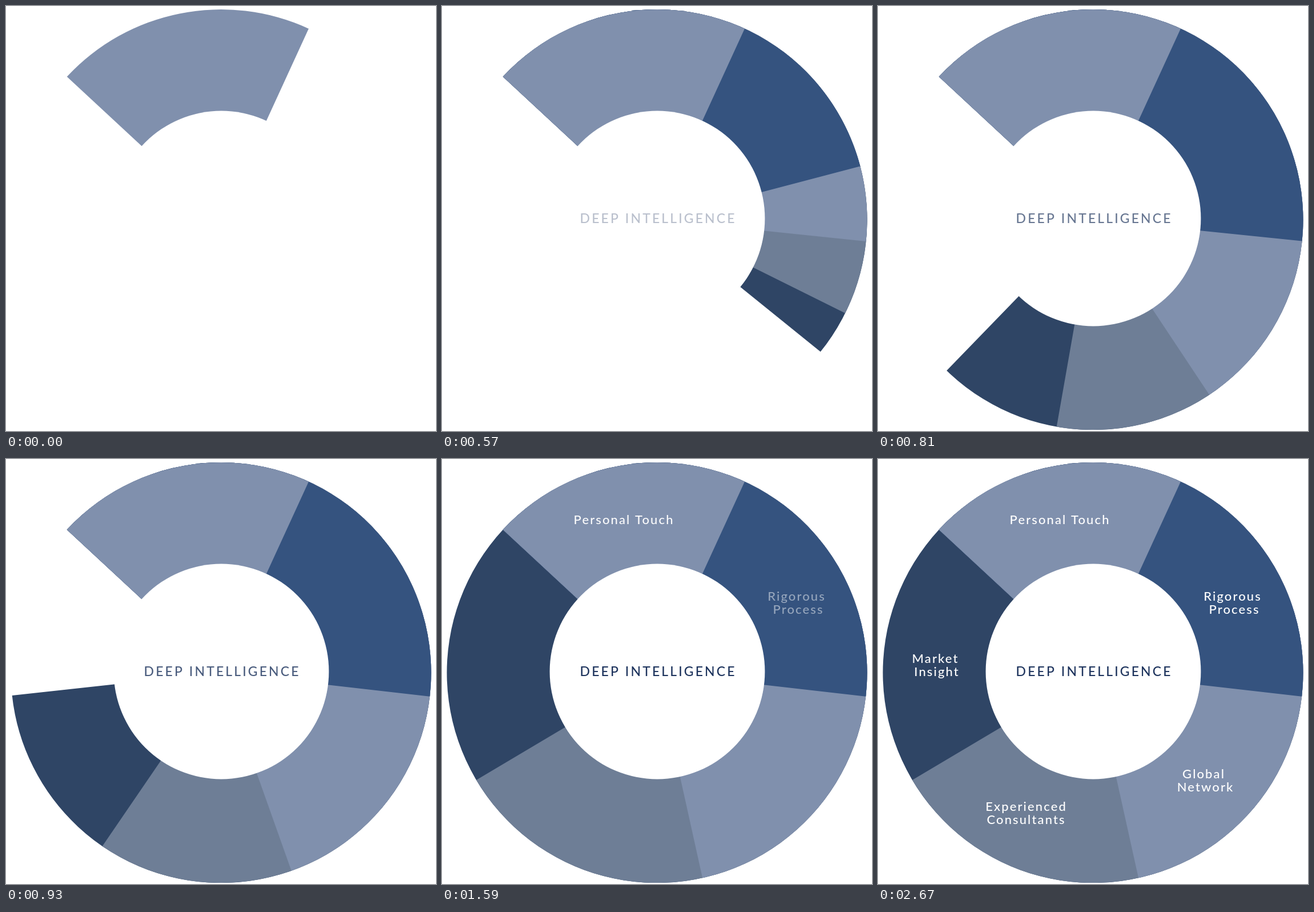
These frames come from a looping animation (753 by 744 pixels, 8 s). An HTML page with a canvas:

```html
<!DOCTYPE html>
<html lang="en">
<head>
<meta charset="utf-8">
<title>Deep Intelligence</title>
<style>
  html, body { margin: 0; height: 100%; overflow: hidden; background: #fff; }
  canvas { display: block; }
</style>
</head>
<body>
<canvas id="stage" width="753" height="744"></canvas>
<script>
const ctx = document.getElementById('stage').getContext('2d');
const LOOP = 8000, STEP = 30;
const CX = 376.5, CY = 374.1, RADIUS = 368;
const START = -47.15; // degrees clockwise from the top

const clamp = x => Math.min(1, Math.max(0, x));
const easeOut = u => 1 - (1 - u) ** 2;
const easeInOut = u => u * u * (3 - 2 * u);
const progress = (t, from, to, ease = easeOut) => ease(clamp((t - from) / (to - from)));

// Every arc grows from START; later ones lie on top of earlier ones.
const arcs = [
  { color: '#2f4565', sweep: 360, from: -74, to: 1233, ease: easeInOut, shown: 30 },
  { color: '#6e7e96', sweep: 286.45, from: 225, to: 1225 },
  { color: '#8090ad', sweep: 214.65, from: 186, to: 1095 },
  { color: '#35537f', sweep: 143.65, from: 104, to: 861 },
  { color: '#8090ad', sweep: 71.8, from: -1000, to: -1 },
];

// Each line: text, centre x, baseline y.
const labels = [
  [['Personal Touch', 317.5, 114]],
  [['Rigorous', 620, 248], ['Process', 623, 271]],
  [['Global', 569.5, 559], ['Network', 572.5, 582]],
  [['Experienced', 258.5, 616], ['Consultants', 258.5, 639]],
  [['Market', 99.5, 357], ['Insight', 102, 380]],
];

function drawArc({ color, sweep, from, to, ease, shown = 0 }, t) {
  const angle = sweep * progress(t, from, to, ease);
  if (angle <= 0 || t < shown) return;
  const rad = deg => (deg - 90) * Math.PI / 180;
  ctx.fillStyle = color;
  ctx.beginPath();
  ctx.moveTo(CX, CY);
  ctx.arc(CX, CY, RADIUS, rad(START), rad(START + angle));
  ctx.fill();
}

function drawText(text, x, y, size, spacing, color, alpha) {
  ctx.globalAlpha = alpha;
  ctx.fillStyle = color;
  ctx.font = `500 ${size}px Lato, sans-serif`;
  ctx.letterSpacing = spacing + 'px';
  ctx.textAlign = 'center';
  ctx.fillText(text, x + spacing / 2, y);
  ctx.globalAlpha = 1;
}

function draw(t) {
  ctx.fillStyle = '#fff';
  ctx.fillRect(0, 0, 753, 744);
  arcs.forEach(arc => drawArc(arc, t));

  ctx.fillStyle = '#fff';
  ctx.beginPath();
  ctx.arc(377, 372, 188.4, 0, 2 * Math.PI);
  ctx.fill();

  drawText('DEEP INTELLIGENCE', 377, 380.3, 23, 3.1, '#1f355e', progress(t, 413, 1340));
  labels.forEach((lines, i) => {
    const begin = 1200 + 255 * i;
    const alpha = progress(t, begin, begin + 480);
    lines.forEach(([text, x, y]) => drawText(text, x, y, 22, 2.1, '#fff', alpha));
  });
}

function tick() {
  const t = performance.now() % LOOP;
  draw(Math.floor(t / STEP) * STEP);
  requestAnimationFrame(tick);
}
tick();
</script>
</body>
</html>
```
